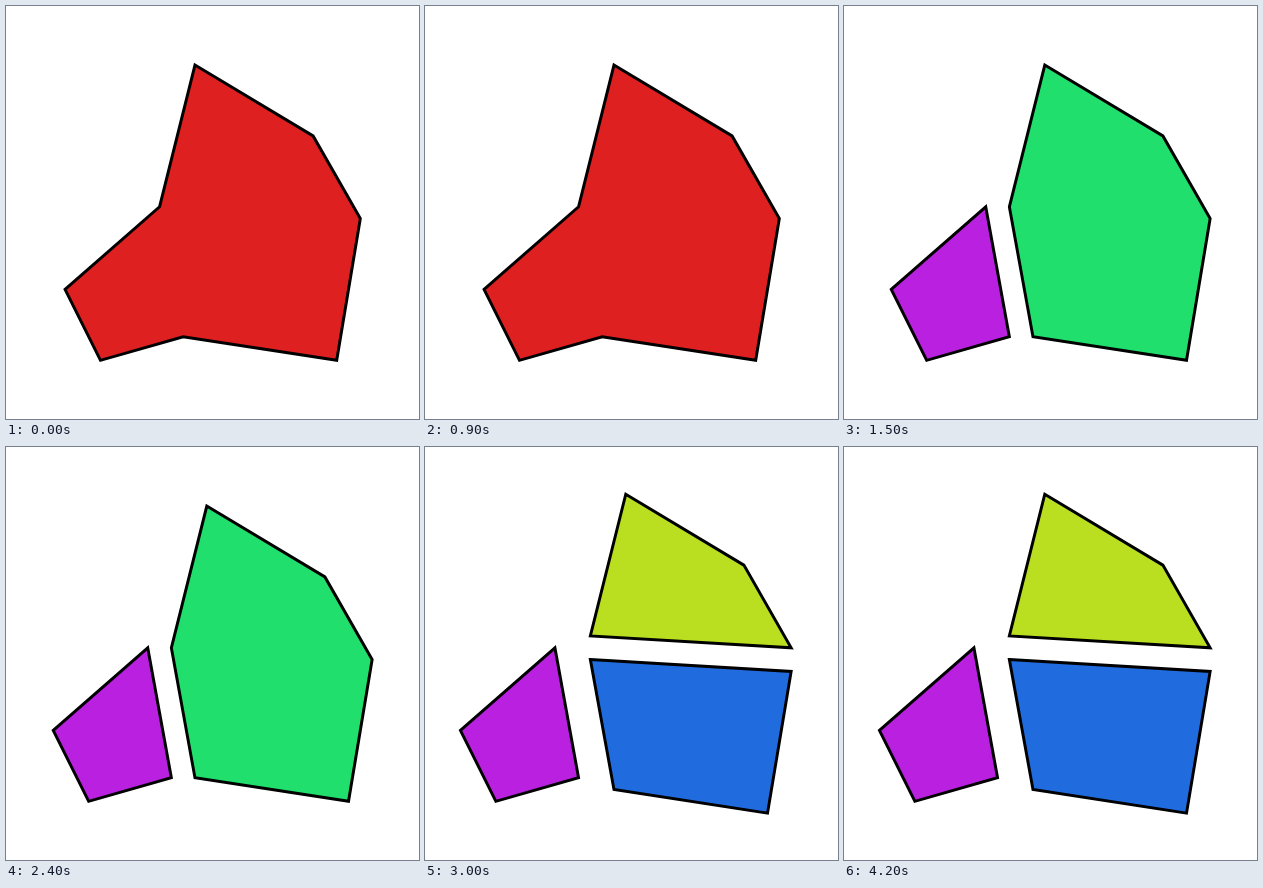
Write an HTML page with a canvas that moves like this. It is 413 by 413 pixels and loops after 5000 ms.

```html
<!DOCTYPE html>
<html>
<head>
<meta charset="utf-8">
<title>Polygon split into convex parts</title>
<style>
  html, body { margin: 0; width: 100%; height: 100%; overflow: hidden; background: #fff; }
  canvas { display: block; }
</style>
</head>
<body>
<canvas id="stage" width="413" height="413"></canvas>
<script>
const ctx = document.getElementById("stage").getContext("2d");
const STEP = 1500, LOOP = 5000;
const MM = 300 / 25.4; // pixels per millimetre at 300 dpi

// Outline in millimetres, clockwise from the inner corner.
const whole = [[13, 17], [16, 5], [26, 11], [30, 18], [28, 30], [15, 28], [8, 30], [5, 24]];

// Cuts along the diagonal from the first corner to corner k.
const cut = (shape, k) => [shape.slice(0, k + 1), [shape[0], ...shape.slice(k)]];

const [right, left] = cut(whole, 5);
const [upper, lower] = cut(right, 3);

function drawShape(shape, color, dx, dy) {
  ctx.beginPath();
  for (const [x, y] of shape) ctx.lineTo((x + dx) * MM, (y + dy) * MM);
  ctx.closePath();
  ctx.fillStyle = `hsl(${color * 72}, 75%, 50%)`;
  ctx.fill();
  ctx.stroke();
}

function draw(time) {
  const cuts = Math.min(2, Math.floor(time / STEP));
  ctx.clearRect(0, 0, 413, 413);
  ctx.lineWidth = MM / 4;

  if (cuts === 0) {
    drawShape(whole, 0, 0, 0);
    return;
  }
  drawShape(left, 4, -cuts, 0);
  if (cuts === 1) {
    drawShape(right, 2, 1, 0);
  } else {
    drawShape(upper, 1, 1, -1);
    drawShape(lower, 3, 1, 1);
  }
}

function tick() {
  draw(performance.now() % LOOP);
  requestAnimationFrame(tick);
}
tick();
</script>
</body>
</html>
```
